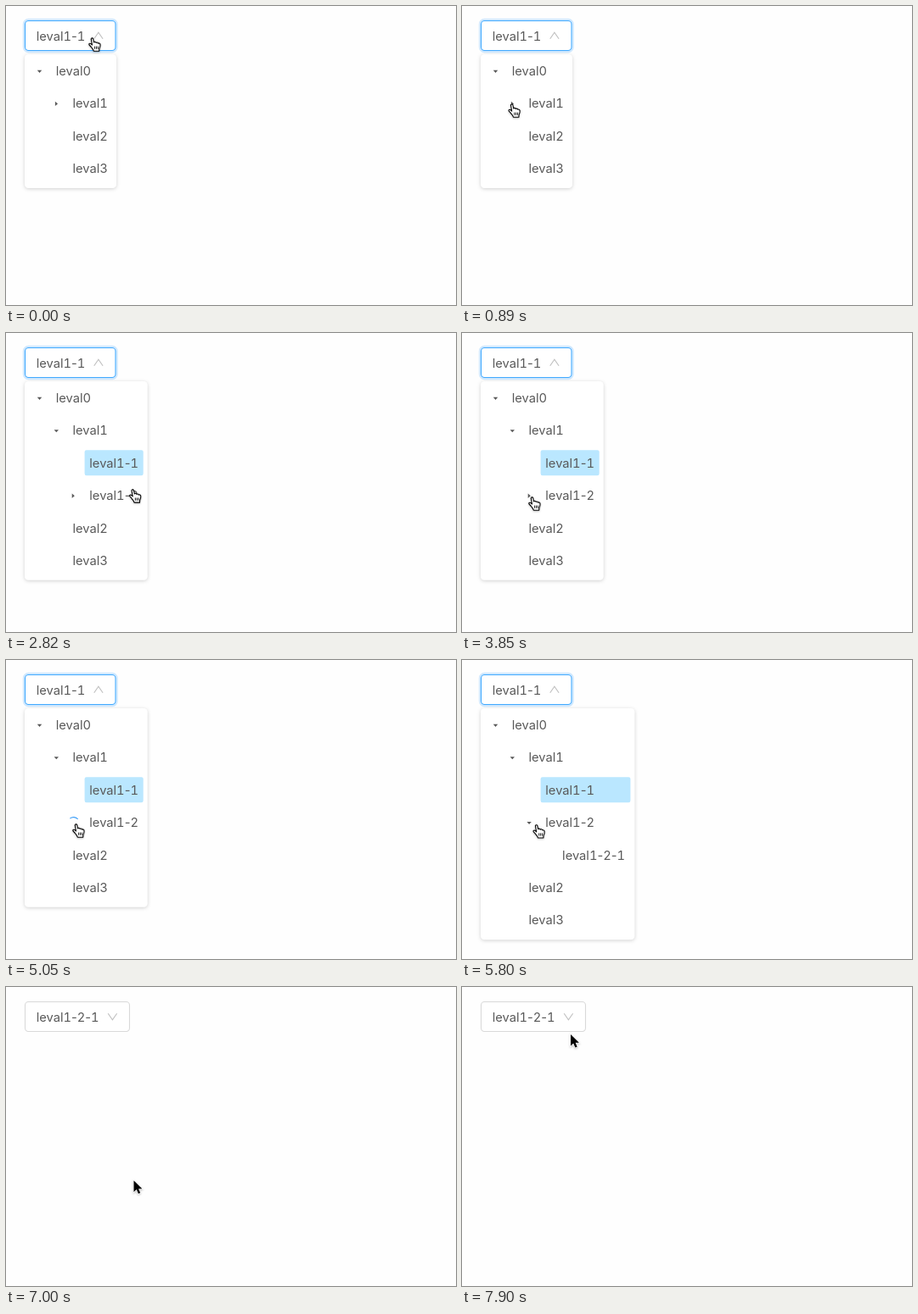
An HTML page for the animation above (8000 ms loop, 530x353 px).

```html
<!DOCTYPE html>
<html lang="en">
<head>
<meta charset="utf-8">
<title>Tree select</title>
<style>
  html, body { margin: 0; width: 100%; height: 100%; overflow: hidden; background: #fefefe; }
  svg { display: block; width: 530px; height: 353px; }
  text { font: 14.7px Inter, "Open Sans", sans-serif; font-variant-numeric: tabular-nums; fill: #595959; }
  .dash { font-variant-numeric: normal; }
  .line { fill: none; stroke-width: 1.1; }
  #panel { filter: drop-shadow(0 1px 2px rgba(0, 0, 0, .18)); }
  #hand, #arrow { filter: drop-shadow(0 1px 1px rgba(0, 0, 0, .25)); }
</style>
</head>
<body>
<svg viewBox="0 0 530 353">
  <rect id="glow" class="line" x="20.9" y="15.9" height="38.2" rx="5.5" stroke="#1890ff" style="stroke-width:2.2"/>
  <rect id="field" x="22.5" y="17.5" height="35" rx="4" fill="#fff" stroke-width="1.1"/>
  <text id="value" x="35.7" y="41"/>
  <path id="chevron" class="line" d="M-5.2 3.8 0-3.8 5.2 3.8" stroke="#bfbfbf"/>
  <g id="drop">
    <rect id="panel" x="22" y="57" rx="4.4" fill="#fff"/>
    <g id="rows"></g>
  </g>
  <g id="pointer">
    <g id="hand" transform="translate(-4.5 -.5)" stroke="#000" stroke-width="1.1" stroke-linejoin="round">
      <path fill="#fff" d="M3.3 2.2C3.1.6 5.3.4 5.7 1.9L6.6 6C7 4.9 8.9 5 9.1 6.5C9.7 5.6 11.3 5.9 11.5 7.2C12.3 6.6 13.9 7 14 8.6C14.2 10.8 13.6 12.2 12.9 13.5L12.7 16.2H6.3C6 14.3 4.6 13.2 3.6 11.8C2.8 10.5 1.5 9.6.9 8.6C.5 7.4 1.9 6.7 3.1 7.7L4.5 9Z"/>
      <path d="M7.6 10.6v3.2M9.5 10.6v3.2M11.4 10.6v3.2" stroke-width=".9"/>
    </g>
    <path id="arrow" d="M0 0V13.6L3.2 10.6 5.4 15.5 7.7 14.5 5.6 9.8H9.9Z" stroke="#fff" paint-order="stroke" stroke-width="1.4"/>
  </g>
</svg>
<script>
const LOOP = 8000, TICK = 148, LOAD = 1040, PICK = 6700;
const ROW = 38.4, INDENT = 19.8, LEFT = 22, TOP = 57;
const loads = [1330, 4150];

const linear = u => u;
const easeIn = u => u ** 3;
const easeOut = u => 1 - (1 - u) ** 2;
const smooth = u => u * u * (3 - 2 * u);

// pointer moves: quadratic curves walked in a few jumps
const home = [101.5, 37.5];
const moves = [
  { start: 300, jumps: 5, bend: [72, 82], to: [57.5, 118.5], ease: easeOut },
  { start: 2670, jumps: 5, bend: [241.5, 195], to: [74.5, 193.5], ease: easeOut },
  { start: 3560, jumps: 1, bend: [78, 193.5], to: [82.5, 193.5], ease: linear },
  { start: 5800, jumps: 4, bend: [249.5, 219.5], to: [150.5, 228.5], ease: easeIn },
  { start: 7450, jumps: 4, bend: [142, 110], to: [128, 56], ease: linear }
];

const $ = id => document.getElementById(id);
const set = (el, attrs) => { for (const k in attrs) el.setAttribute(k, attrs[k]); };
const show = (el, on) => { el.style.display = on ? '' : 'none'; };
const label = s => s.replace(/-/g, '<tspan class="dash">-</tspan>');
const hold = (t, start, step) => Math.floor((t - start) / step) * step;

function pointer(t) {
  let pos = home;
  for (const { start, jumps, bend, to, ease } of moves) {
    if (t < start) break;
    const p = ease(Math.min(1, (hold(t, start, TICK) / TICK + 1) / jumps)), q = 1 - p;
    pos = pos.map((from, i) => q * q * from + 2 * p * q * bend[i] + p * p * to[i]);
  }
  return pos;
}

// name, depth, node marker
function tree(level, t) {
  const [first, second] = loads.map(s => t < s ? 'right' : t < s + LOAD ? 'spin' : 'down');
  const list = [['leval0', 0, 'down'], ['leval1', 1, first]];
  if (level > 0) list.push(['leval1-1', 2], ['leval1-2', 2, second]);
  if (level > 1) list.push(['leval1-2-1', 3]);
  return [...list, ['leval2', 1], ['leval3', 1]];
}

function marker(kind, x, y, spin) {
  if (!kind) return '';
  if (kind === 'spin')
    return `<path class="line" d="M0-6.6A6.6 6.6 0 0 1 6.6 0" stroke="#40a0f8" transform="translate(${x + .5} ${y}) rotate(${spin})"/>`;
  const d = kind === 'down' ? 'M-2.7-1.2H2.7L0 1.9Z' : 'M-1.4-2.7V2.7L1.7 0Z';
  return `<path d="${d}" fill="#595959" transform="translate(${x} ${y})"/>`;
}

function row([name, depth, kind], i, width, chosen, spin) {
  const y = 76.6 + ROW * i, x = 58.7 + INDENT * depth;
  const back = chosen[name]
    ? `<rect x="${x - 5.7}" y="${y - 15.2}" width="${LEFT + width - x + .7}" height="30" rx="2.2" fill="#bae7ff" opacity="${chosen[name]}"/>` : '';
  return back + marker(kind, 39.5 + INDENT * depth, y + .4, spin) + `<text x="${x}" y="${y + 5.4}">${label(name)}</text>`;
}

function drawField(done, close) {
  const width = done ? 123 : 106.5, fade = close ** 3;
  const mix = a => Math.round(a + (217 - a) * fade);
  set($('field'), { width, stroke: `rgb(${[64, 169, 255].map(mix)})` });
  set($('glow'), { width: width + 3.2, opacity: .2 * (1 - close) ** 2 });
  set($('chevron'), { transform: `translate(${width + 2.4} 35) rotate(${-180 * close})` });
  $('value').innerHTML = label(done ? 'leval1-2-1' : 'leval1-1');
}

function drawPanel(t, done) {
  const level = loads.filter(s => t >= s + LOAD).length;
  const list = tree(level, t), width = 108 + 36.7 * level;
  const chosen = done ? { 'leval1-1': .66, 'leval1-2-1': .66 } : { 'leval1-1': 1 };
  const spin = hold(t, loads[level], TICK) * .36;
  set($('panel'), { width, height: list.length * ROW + 4.4 });
  set($('drop'), { transform: done ? `translate(${LEFT} ${TOP}) scale(.995) translate(${-LEFT} ${-TOP})` : '' });
  $('rows').innerHTML = list.map((r, i) => row(r, i, width, chosen, spin)).join('');
}

function draw(t) {
  const done = t >= PICK, open = t < PICK + 150;
  const close = done ? smooth(Math.min(1, (100 + hold(t, PICK, 150)) / 300)) : 0;
  drawField(done, close);
  show($('drop'), open);
  if (open) drawPanel(t, done);
  show($('hand'), !done);
  show($('arrow'), done);
  set($('pointer'), { transform: `translate(${pointer(t)})` });
}

const begin = performance.now();
function tick() {
  draw((performance.now() - begin) % LOOP);
  requestAnimationFrame(tick);
}
tick();
</script>
</body>
</html>
```
